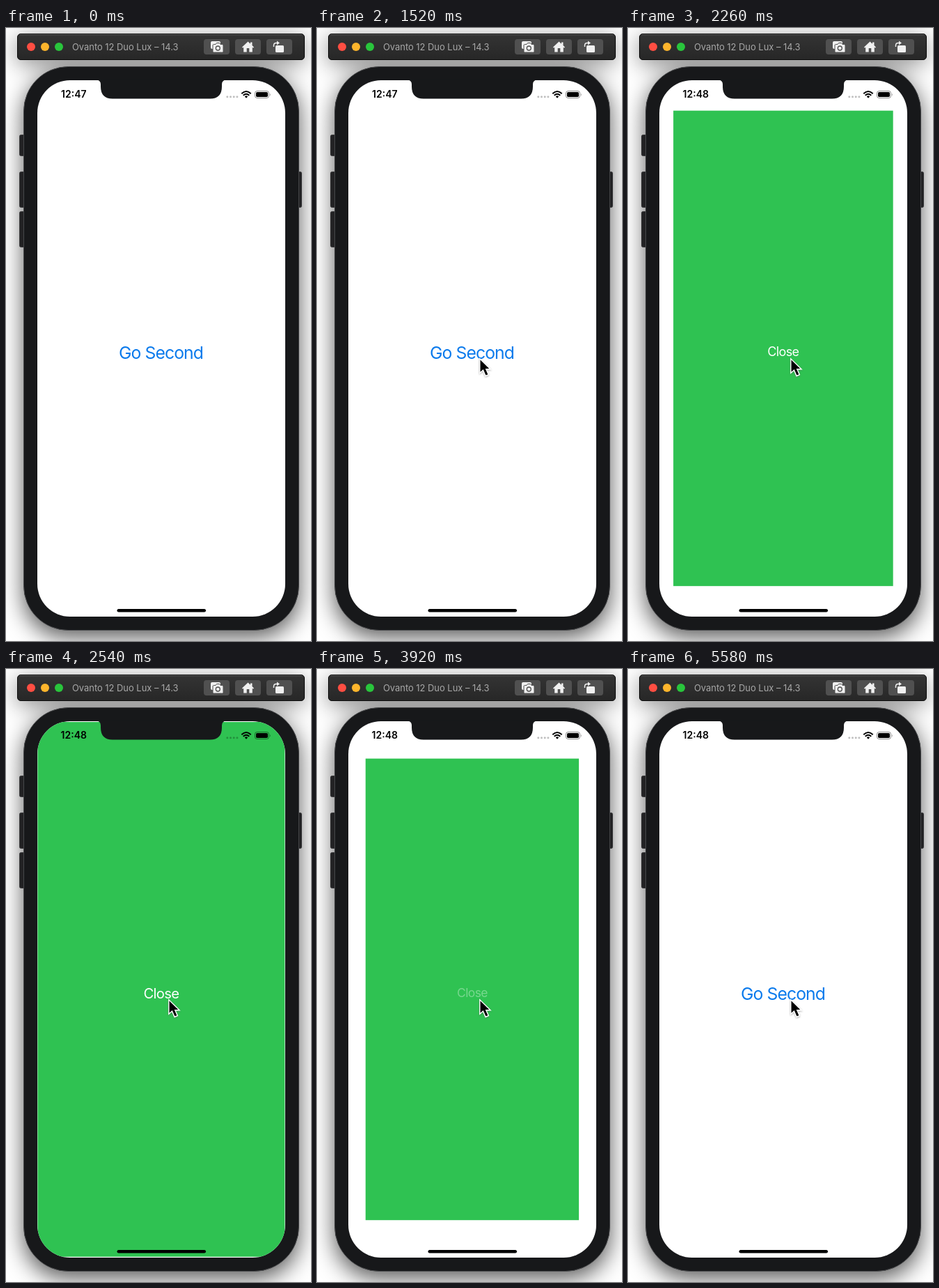
Write an HTML page that moves like this. It is 438 px wide and 880 px high and loops after 5680 ms.

```html
<!DOCTYPE html>
<html lang="en">
<head>
<meta charset="utf-8">
<title>Zoom transition</title>
<style>
  html, body { margin: 0; width: 100%; height: 100%; overflow: hidden; background: #fff; }
  svg { display: block; width: 438px; height: 880px; }
  text { font-family: Inter, Roboto, sans-serif; }
  .icon { fill: #f0f0f0; }
</style>
</head>
<body>
<svg viewBox="0 0 438 880">
  <defs>
    <filter id="blur" x="-30%" y="-30%" width="160%" height="160%">
      <feGaussianBlur stdDeviation="16"/>
    </filter>
    <filter id="glow" x="-50%" y="-50%" width="200%" height="200%">
      <feDropShadow dx="0" dy="1" stdDeviation="1.3" flood-color="#555" flood-opacity=".5"/>
    </filter>
    <linearGradient id="bar" x2="0" y2="1">
      <stop stop-color="#343434"/><stop offset="1" stop-color="#272727"/>
    </linearGradient>
    <clipPath id="screen"><rect x="45" y="75" width="356" height="770" rx="47"/></clipPath>
  </defs>

  <rect width="438" height="880" fill="#fff"/>
  <g filter="url(#blur)">
    <rect x="16" y="14" width="412" height="38" rx="5" fill-opacity=".45"/>
    <rect x="25" y="65" width="396" height="810" rx="62" fill-opacity=".65"/>
  </g>

  <!-- window bar -->
  <rect x="16.500" y="8.500" width="412" height="37" rx="4.500" fill="url(#bar)" stroke="#0c0c0c"/>
  <path d="M20 9.500H425" stroke="#585858"/>
  <circle cx="36" cy="27" r="6" fill="#ff4e42"/>
  <circle cx="56" cy="27" r="6" fill="#fdb52c"/>
  <circle cx="76" cy="27" r="6" fill="#29c53c"/>
  <text x="95" y="32" font-size="12.900" fill="#a8a8a8">Ovanto 12 Duo Lux – 14.3</text>
  <g fill="#505050">
    <rect x="284" y="16" width="37" height="22" rx="4"/>
    <rect x="329" y="16" width="37" height="22" rx="4"/>
    <rect x="374" y="16" width="37" height="22" rx="4"/>
  </g>
  <g class="icon">
    <rect x="294" y="19" width="14" height="11" rx="2"/>
    <path d="M297 25q0-1.500 1.500-1.500H301l1.500-2h4l1.500 2h2.500q1.500 0 1.500 1.500v8.500q0 1.500-1.500 1.500h-12q-1.500 0-1.500-1.500z" stroke="#505050"/>
    <circle cx="304.300" cy="29" r="3" fill="none" stroke="#505050" stroke-width="1.300"/>
    <path d="M339 27.500L347.500 19.500 351 22.700V20.500H353.500V25L356 27.500 355 28.700 353.800 27.600V34.500H349.300V29H345.700V34.500H341.200V27.600L340 28.700Z"/>
    <rect x="387" y="25" width="12" height="10" rx="1.500"/>
    <path d="M384.500 27V25Q384.500 21.500 388 21.500H390" fill="none" stroke="#f0f0f0" stroke-width="1.500"/>
    <path d="M389 18.500L393 21.500 389 24.500Z"/>
  </g>

  <!-- device -->
  <g fill="#222224" stroke="#3c3c3e">
    <rect x="19.500" y="153.500" width="10" height="30" rx="2"/>
    <rect x="19.500" y="206.500" width="10" height="51" rx="2"/>
    <rect x="19.500" y="263.500" width="10" height="51" rx="2"/>
    <rect x="414.500" y="206.500" width="10" height="51" rx="2"/>
  </g>
  <rect x="25.500" y="55.500" width="395" height="809" rx="64" fill="#17181a" stroke="#47484a"/>
  <rect x="45" y="75" width="356" height="770" rx="47" fill="#fff"/>

  <g clip-path="url(#screen)">
    <text id="go" x="222.500" y="475" text-anchor="middle" font-size="24.700" letter-spacing="-.9" fill="#0a7aec">Go Second</text>
    <g id="panel">
      <rect x="-178" y="-385" width="356" height="770" fill="#2fc252"/>
      <text id="close" y="13" text-anchor="middle" font-size="20.300" letter-spacing="-.7" fill="#fff">Close</text>
    </g>
  </g>
  <path d="M130 74.500Q136 75 136 81V84Q136 101.500 153 101.500H293Q310 101.500 310 84V81Q310 75 316 74.500Z" fill="#17181a"/>

  <!-- status bar -->
  <text id="clock" x="97.300" y="100" text-anchor="middle" font-size="14" font-weight="600">12:47</text>
  <g fill-opacity=".25">
    <circle cx="317.800" cy="98.800" r="1.500"/><circle cx="322.500" cy="98.800" r="1.500"/>
    <circle cx="327.200" cy="98.800" r="1.500"/><circle cx="331.900" cy="98.800" r="1.500"/>
  </g>
  <g fill="none" stroke="#000" stroke-width="2">
    <path d="M338.300 94.200Q345 87.800 351.700 94.200M340.700 96.800Q345 92.800 349.300 96.800"/>
    <path d="M342.800 98.200Q345 96.300 347.200 98.200L345 100.700Z" fill="#000" stroke="none"/>
    <rect x="357.500" y="90.500" width="20" height="10" rx="3" stroke-opacity=".45" stroke-width="1"/>
  </g>
  <rect x="359" y="92" width="17" height="7" rx="1.800"/>
  <path d="M379 93.500q1.500 2 0 4z" fill-opacity=".45"/>
  <rect x="159.500" y="834" width="127.500" height="4.500" rx="2.200"/>

  <path id="cursor" d="M0 0V20.500L4.700 16.300 8.300 24.700 12.500 22.900 9 14.900H15.200Z" stroke="#fff" stroke-width="1.400" filter="url(#glow)"/>
</svg>
<script>
  const LOOP = 5680;
  const [go, panel, close, clock, cursor] =
    ["go", "panel", "close", "clock", "cursor"].map(id => document.getElementById(id));
  const clamp = v => Math.min(1, Math.max(0, v));
  const smooth = v => v * v * (3 - 2 * v);

  function stepAt(t) {
    const r = t % 140;
    return Math.min(119, 3 * Math.floor(t / 140) + (r < 20 ? 0 : r < 120 ? 1 : 2));
  }

  // Opens like a critically damped spring, closes with ease-in-out.
  function panelScale(n) {
    if (n < 44) return 0;
    if (n > 82) return 1 - smooth(clamp((n - 82.340) / 7.070));
    const w = .717 * (n - 43.800);
    return n > 58 ? 1 : 1 - (1 + w) * Math.exp(-w);
  }

  // A pressed button dims at once and fades back after release.
  const press = (n, down, up) => n < down ? 1 : .25 + .75 * clamp((n - up) / 8);

  function draw(n) {
    panel.setAttribute("transform", `translate(222.900 459.900) scale(${panelScale(n)})`);
    go.setAttribute("opacity", press(n, 41, 43));
    close.setAttribute("opacity", press(n, 79, 83));
    clock.textContent = n < 40 ? "12:47" : "12:48";
    const away = (1 - clamp((n - 14) / 10)) ** 2;
    cursor.setAttribute("transform", `translate(${233.800 + 216 * away} ${474.800 + 20 * away})`);
  }

  const start = performance.now();
  function tick() {
    draw(stepAt((performance.now() - start) % LOOP));
    requestAnimationFrame(tick);
  }
  tick();
</script>
</body>
</html>
```
